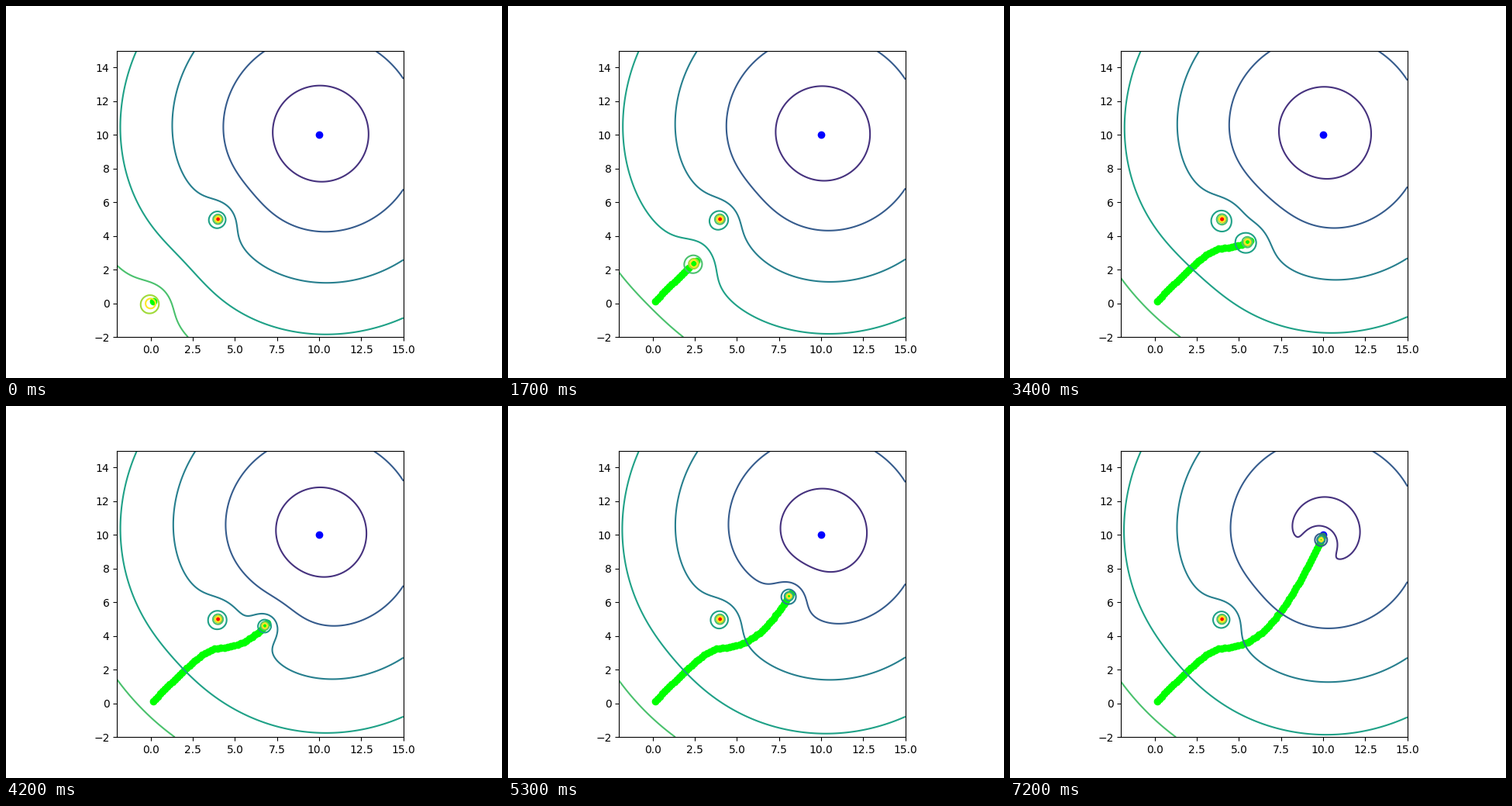
Recreate the animation shown at these times as a matplotlib script. Size 640 px wide and 480 px high, loop 7.3 s.

```python
import numpy as np
import matplotlib.pyplot as plt
from matplotlib.animation import FuncAnimation

FRAMES = 73
INTERVAL = 100
STEP = 0.2
GOAL = np.array([10.0, 10.0])
OBSTACLE = np.array([4.0, 5.0])
REPULSION = 2.0
NEAR = 0.5  # the attraction is quadratic inside this distance
LEVELS = np.arange(0, 22, 3)

axis = np.linspace(-2, 15, 171)
X, Y = np.meshgrid(axis, axis)


def distance(point):
    return np.hypot(X - point[0], Y - point[1])


def attraction(point):
    r = distance(point)
    return np.where(r < NEAR, r**2, r - NEAR / 2)


def repulsion(point):
    return REPULSION / np.maximum(distance(point), 0.02)


def downhill(p):
    """Unit vector of steepest descent at p."""
    to_goal = GOAL - p
    away = p - OBSTACLE
    force = to_goal / np.linalg.norm(to_goal)
    force = force + REPULSION * away / np.linalg.norm(away) ** 3
    return force / np.linalg.norm(force)


path = [np.zeros(2)]
for _ in range(FRAMES):
    path.append(path[-1] + STEP * downhill(path[-1]))
path = np.array(path)

static_field = attraction(GOAL) + repulsion(OBSTACLE)

fig, ax = plt.subplots(figsize=(6.4, 4.8), dpi=100)
ax.set_aspect("equal")
ax.set_xlim(-2, 15)
ax.set_ylim(-2, 15)
ax.set_xticks(np.arange(0, 15.1, 2.5))
ax.set_yticks(np.arange(-2, 15, 2))
ax.plot(*GOAL, "o", color="blue")
ax.plot(*OBSTACLE, "o", color="red")
trail, = ax.plot([], [], "o", color="lime")


def draw(frame):
    for old in list(ax.collections):
        old.remove()
    trail.set_data(path[1:frame + 2, 0], path[1:frame + 2, 1])
    field = static_field + repulsion(path[frame])
    ax.contour(X, Y, field, levels=LEVELS, cmap="viridis")
    return [trail]


anim = FuncAnimation(fig, draw, frames=FRAMES, interval=INTERVAL, repeat=True)
plt.show()
```
